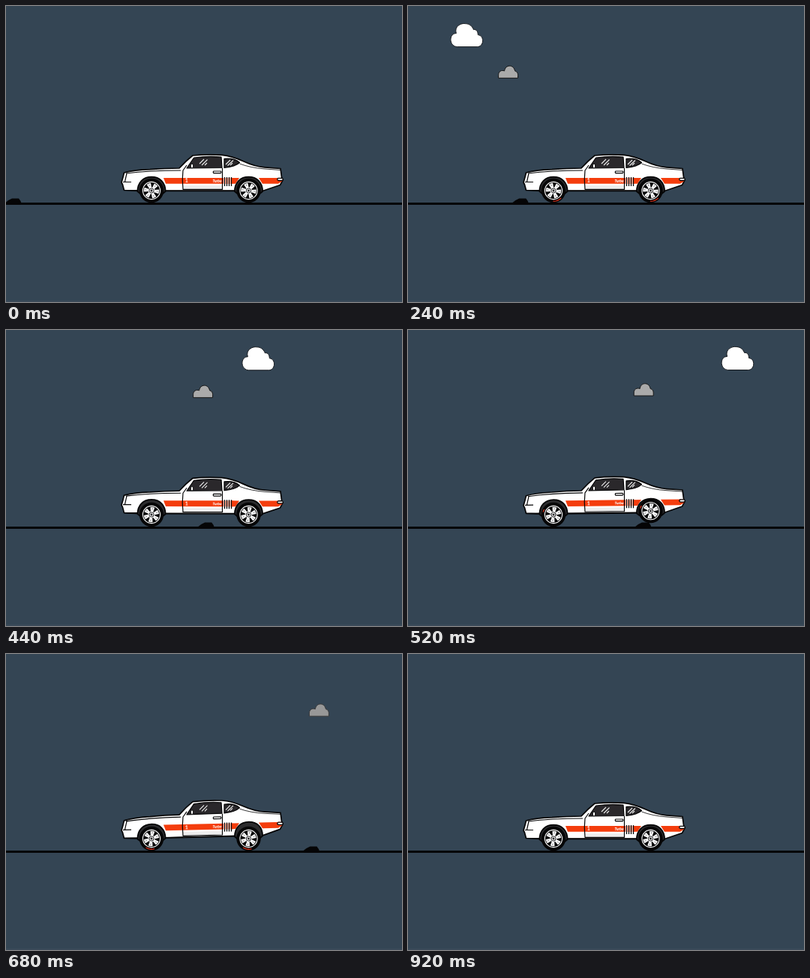
Write an HTML page with a canvas that moves like this. It is 528 px wide and 396 px high and loops after 0.96 s.

```html
<!DOCTYPE html>
<html lang="en">
<head>
<meta charset="utf-8">
<title>Bumpy road</title>
<style>
html, body { margin: 0; width: 100%; height: 100%; overflow: hidden; background: #344554; }
canvas { display: block; }
</style>
</head>
<body>
<canvas id="stage" width="528" height="396"></canvas>
<script>
const ctx = document.getElementById('stage').getContext('2d');
const LOOP = 960, STEP = 40, TAU = Math.PI * 2;
const INK = '#050506', WHITE = '#fff', ORANGE = '#f43d0d', GLASS = '#2a282b', LINER = '#2b2b2d';
const FRONT_X = 194, REAR_X = 323.5, AXLE_Y = 247;

const BIG_CLOUD = 'M-13 0C-24-1-24-18-14-18C-17-28-7-32-2-31C5-31 8-26 9-23C13-24 15-20 15-16C24-15 23 0 14 0Z';
const SMALL_CLOUD = 'M-13 0V-4C-13-9-9-11-5-9.5C-4-18 7-19 9-9.5C12-9 13-6 13-4V0Z';

// Keys are [time, offset] pairs, eased between neighbours.
const bodyFront = [[0, 0], [260, 0], [320, -5], [350, -5.2], [440, -1.8], [600, -1.4], [760, -0.6], [900, 0]];
const bodyRear = [[0, 0], [270, 0], [320, -2], [440, -1.6], [490, -1.6], [560, -5.2], [600, -5.6], [760, -2.7], [900, 0]];
const frontWheel = [[0, 0], [265, 0], [320, -7], [390, 0]];
const rearWheel = [[0, 0], [485, 0], [540, -7], [600, -2], [640, 0]];

function ease(keys, t) {
  const i = keys.findIndex(k => k[0] > t);
  if (i < 0) return keys[keys.length - 1][1];
  const [t0, v0] = keys[i - 1], [t1, v1] = keys[i];
  const u = (t - t0) / (t1 - t0);
  return v0 + (v1 - v0) * u * u * (3 - 2 * u);
}

function paint(path, fill, stroke, width = 1) {
  const p = new Path2D(path);
  if (fill) { ctx.fillStyle = fill; ctx.fill(p); }
  if (stroke) { ctx.strokeStyle = stroke; ctx.lineWidth = width; ctx.stroke(p); }
}

function paintAt(x, y, ...shape) {
  ctx.save();
  ctx.translate(x, y);
  paint(...shape);
  ctx.restore();
}

function disc(x, y, r, fill) {
  ctx.beginPath();
  ctx.arc(x, y, r, 0, TAU);
  ctx.fillStyle = fill;
  ctx.fill();
}

function ring(x, y, r, color, width, from = 0, to = TAU) {
  ctx.beginPath();
  ctx.arc(x, y, r, from, to);
  ctx.strokeStyle = color;
  ctx.lineWidth = width;
  ctx.stroke();
}

const gray = v => `rgb(${v},${v},${v})`;

function wheel(x, y, spin) {
  disc(x, y, 16.2, INK);
  ctx.save();
  ctx.beginPath();
  ctx.rect(x - 18, y - 7, 36, 26);
  ctx.clip();
  ring(x, y, 14.2, '#d8321a', 1.3, spin - 0.42, spin + 0.42);
  ctx.restore();
  ring(x, y, 11.6, WHITE, 1.1);

  ctx.save();
  ctx.translate(x, y);
  ctx.rotate(spin);
  for (let i = 0; i < 6; i++) {
    ctx.rotate(TAU / 6);
    paint('M3.5-1.6L9.8-2.9Q10.6 0 9.8 2.9L3.5 1.6Z', WHITE);
    paint('M6.5 0H9', null, '#77777a', 0.8);
  }
  disc(0, 0, 4.4, WHITE);
  disc(0, 0, 3.5, LINER);
  ring(0, 0, 2, WHITE, 1);
  ctx.restore();
}

function label(text, x, y, font) {
  ctx.font = font;
  ctx.fillStyle = WHITE;
  ctx.fillText(text, x, y);
}

function body(front, rear) {
  const slope = (rear - front) / (REAR_X - FRONT_X);
  ctx.save();
  ctx.transform(1, slope, 0, 1, 0, front - slope * FRONT_X);
  ctx.lineJoin = 'round';

  const shell = 'M157.5 223Q170 219.5 192 218.6Q212 217 231 217Q240 207 249 200Q268 198 288 199.3' +
    'Q301 200.5 316 207.5Q332 215 345 215.8L366 217.5L367.5 229L369 233L365.5 239.5L342 247.5H177L157.5 246.5' +
    'L155.5 239L154 236L156 229Z';
  paint(shell, WHITE, INK, 1.7);

  ctx.save();
  ctx.clip(new Path2D(shell));
  paint('M210 230H290V237.8H213Z', ORANGE);
  paint('M301 230H311L306 237.8H301Z', ORANGE);
  paint('M337 230H369V234L363 237.8H342Z', ORANGE);
  paint('M236 240H288V245H236Z', '#ededed');
  paint('M156 247H178M210 247.4H307', null, INK, 2.2);
  ctx.restore();

  // Panel lines
  paint('M160 224Q190 220 233 220', null, INK, 1.2);
  paint('M156 235.5H167M161 224L158.5 235', null, INK, 1.2);
  paint('M241 213L236 220Q234.5 232 236 245.3H288.5V217', null, INK, 1.2);
  paint('M311.5 211Q326 216.5 345 218L366 219.5', null, INK, 0.8);
  for (let x = 291.5; x < 302; x += 3) {
    paint(`M${x} 229V241`, null, INK, 1.3);
    paint(`M${x + 1.4} 230V238`, null, ORANGE, 0.8);
  }

  // Windows and fittings
  paint('M241 217L250.5 203Q269 200.3 287 202L288 216.5Z', GLASS, INK, 1.2);
  paint('M291 204.5Q304 203 311.5 209.5Q306 214.8 291 216.3Z', GLASS, INK, 1.3);
  paint('M258 211L264 205M261 213L268.5 205.5M265 213L268 210', null, '#eee', 1.1);
  paint('M293 212L299 206M295.5 213.5L303 206.5M299 213L302 210', null, '#eee', 1.1);
  paint('M246.5 211.5H249.5V216.5H246.5Z', WHITE, INK, 0.8);
  paint('M277 221H286Q288 222.3 286 223.7H277Q275.5 222.3 277 221Z', WHITE, INK, 1.2);
  paint('M363 230.3H368Q371 231.7 368 233.5H363Q360.5 232 363 230.3Z', WHITE, INK, 1.3);
  label('1', 238.8, 236.3, 'bold 7px Lato, sans-serif');
  label('Turbo', 275.5, 235.8, 'italic 900 4.8px Lato, sans-serif');

  // Wheel arches
  for (const x of [FRONT_X, REAR_X]) {
    paintAt(x, AXLE_Y, 'M-18.6 1C-18.6-11-11-18.3 0-18.3S18.6-11 18.6 1L15 4H-15Z', LINER, INK, 1.8);
  }
  ctx.restore();
}

function draw(t) {
  ctx.fillStyle = '#344554';
  ctx.fillRect(0, 0, 528, 396);
  ctx.fillStyle = '#3a4a59';
  ctx.fillRect(0, 394, 528, 2);

  const dusk = Math.max(0, Math.min(1, (t - 600) / 160));
  paintAt(82 + (t - 160) * 0.645, 98.8 - (t - 160) * 0.03,
    SMALL_CLOUD, gray(170 - 36 * dusk), gray(22 + 70 * dusk));
  paintAt(181.5 + (t - 320) * 1.29, 54.3 - (t - 320) * 0.004, BIG_CLOUD, WHITE, '#16191d');

  ctx.fillStyle = INK;
  ctx.fillRect(0, 263, 528, 3);
  paintAt(10 + t * 0.5845, 264, 'M-12 0L-7-4L-2-6.6L7-6.4L9.5-3L10.5 0Z', INK);

  const spin = (248 - t * 0.75) * Math.PI / 180;
  body(ease(bodyFront, t), ease(bodyRear, t));
  wheel(FRONT_X, AXLE_Y + ease(frontWheel, t), spin);
  wheel(REAR_X, AXLE_Y + ease(rearWheel, t), spin);
}

const start = performance.now();
function tick() {
  const t = (performance.now() - start) % LOOP;
  draw(Math.floor(t / STEP) * STEP);
  requestAnimationFrame(tick);
}
tick();
</script>
</body>
</html>
```
